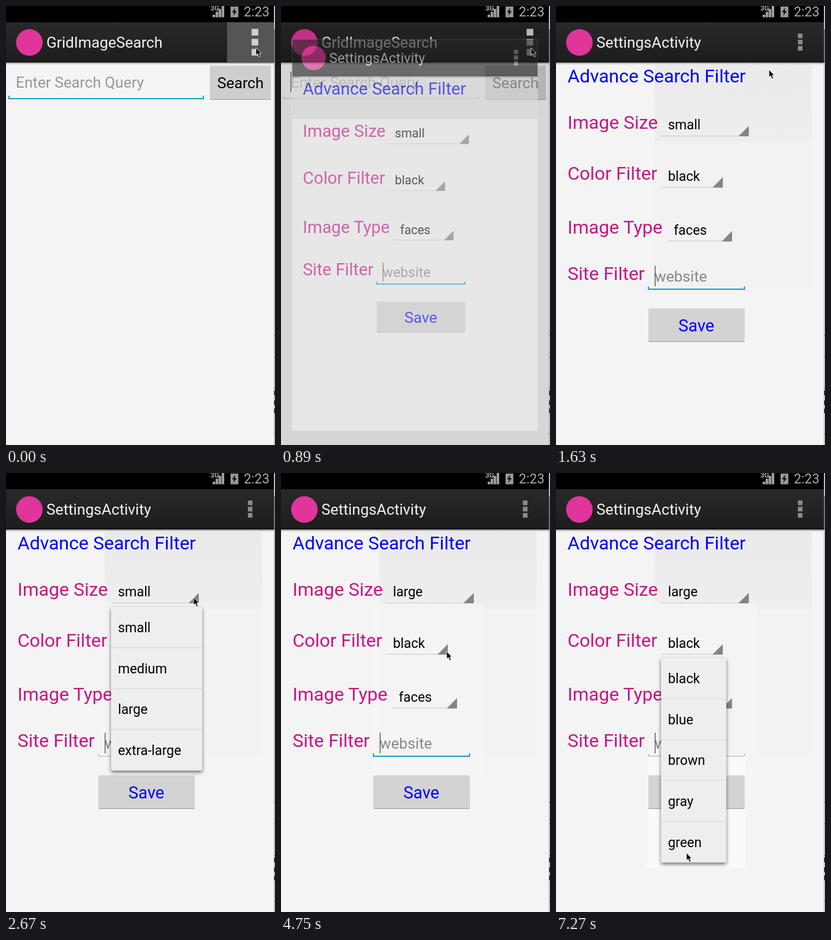
An HTML page for the animation above (8000 ms loop, 466 by 758 pixels).

```html
<!DOCTYPE html>
<html>
<head>
<meta charset="utf-8">
<style>
html, body { margin: 0; width: 100%; height: 100%; overflow: hidden; background: #f4f4f4; }
svg { display: block; width: 466px; height: 758px; overflow: hidden; font-family: Roboto, "Noto Sans", sans-serif; }
.popup > .panel { filter: drop-shadow(0 3px 3px rgba(0,0,0,.55)); }
</style>
</head>
<body>
<svg id="stage" viewBox="0 0 466 758"></svg>
<script>
const LOOP = 8000, ROW = 70.7;

const rect = (x, y, w, h, fill, extra = '') =>
  `<rect x="${x}" y="${y}" width="${w}" height="${h}" fill="${fill}" ${extra}/>`;
const text = (x, y, size, fill, value, extra = '') =>
  `<text x="${x}" y="${y}" font-size="${size}" fill="${fill}" ${extra}>${value}</text>`;
const path = (d, fill, extra = '') => `<path d="${d}" fill="${fill}" ${extra}/>`;

const header = title =>
  rect(0, 28, 464, 70, 'url(#bar)') + rect(0, 95.5, 464, 2, '#0c0c0c') +
  rect(0, 97.5, 464, 4, 'url(#shade)') +
  `<circle cx="40.5" cy="63" r="23" fill="#e0359a"/>` + text(70, 72, 26.2, '#f3f3f3', title);

const dots = (x, y, size, pitch, fill) =>
  [0, 1, 2].map(i => rect(x, y + i * pitch, size, size, fill)).join('');

const button = (x, y, w, h, fill) =>
  rect(x, y + 1, w, h, '#999', 'rx="2"') + rect(x, y, w, h, fill, 'rx="2"');

const underline = (id, x1, x2, y) => {
  const d = `M${x1} ${y - 5}V${y}H${x2}V${y - 5}`;
  return `<g id="${id}Focus">${path(d, 'none', 'stroke="#0f9bc9" stroke-width="2"')}</g>` +
         `<g id="${id}Blur">${path(d, 'none', 'stroke="#aaa"')}</g>`;
};

const spinner = (id, x, right, y, value) =>
  rect(x, y - 47, right - x, 47, '#33b5e5', `id="${id}Press" opacity="0"`) +
  rect(x, y - 1, right - x, 1, '#c6c6c6') +
  path(`M${right} ${y - 18}V${y}H${right - 18}Z`, '#858585') +
  text(x + 12, y - 12, 23.3, '#000', value, `id="${id}Value"`);

const popup = (id, x, y, w, items) =>
  `<g id="${id}" class="popup">` +
  rect(x, y, w, items.length * ROW, '#eee', 'rx="2" class="panel"') +
  rect(x, y + 2 * ROW, w, ROW, '#d4d4d4', `id="${id}Pick" opacity="0"`) +
  items.map((item, i) =>
    (i ? rect(x, y + i * ROW - .5, w, 1, '#d8d8d8') : '') +
    text(x + 12, y + i * ROW + 44, 23.3, '#000', item)).join('') + '</g>';

const label = (y, value) => text(20, y, 32, '#c71585', value);

const searchScreen =
  rect(0, 28, 464, 730, '#f4f4f4') + header('GridImageSearch') +
  rect(383, 28, 81, 69.5, '#555', 'id="pressed"') + dots(425.5, 39.5, 11.5, 17.3, '#d0d0d0') +
  text(17, 141, 26.2, '#979797', 'Enter Search Query') +
  rect(16.5, 113, 1.2, 36, '#444', 'id="caret"') + underline('query', 5, 342, 160) +
  button(353, 103, 106, 58, '#cecece') + text(366, 142, 26.2, '#000', 'Search');

const settingsScreen =
  rect(0, 28, 464, 737, '#f4f4f4') +
  `<g id="residue">${rect(171, 98, 272, 137, 'url(#patch)') + rect(171, 235, 272, 251, '#f2f2f2')}</g>` +
  rect(158, 224, 192, 300, '#f7f7f7', 'id="sizeGhost"') +
  rect(158, 490, 170, 192, '#fafafa', 'id="colorGhost"') +
  header('SettingsActivity') + dots(419, 47.5, 8, 10.8, '#8a8a8a') +
  text(20, 132, 32, '#00f', 'Advance Search Filter') +
  label(212, 'Image Size') + label(300, 'Color Filter') +
  label(393, 'Image Type') + label(473, 'Site Filter') +
  spinner('size', 182, 334, 225, 'small') + spinner('color', 182, 289, 313.5, 'black') +
  spinner('type', 192, 305, 406.5, 'faces') +
  text(171, 476, 26.2, '#888', 'website') + rect(171, 448.5, 1.3, 35.5, '#444') +
  underline('site', 160, 326.5, 489) +
  button(160, 522, 167, 57, '#d3d3d3') + text(212, 561.5, 29.1, '#00f', 'Save');

const statusBar = rect(0, 0, 464, 28, '#000') +
  text(354, 8, 12, '#aaa', '3G', 'font-weight="700"') +
  [0, 1, 2, 3].map(i => rect(358 + i * 5.2, 15 - i * 5, 4.4, 4.5 + i * 5, '#a0a0a0')).join('') +
  rect(389, 1, 13.5, 18.5, '#999') + path('M397 3L391.500 11H395L393.500 17L400 9H396.500Z', '#111') +
  text(412, 18, 23, '#aaa', '2:23');

const edge = rect(464, 0, 2, 758, '#dcdcdc') + rect(464, 0, 1, 758, '#a5a5a5') +
  rect(464, 40, 2, 58, '#777') +
  [568, 605, 660, 738].map(y => rect(464, y, 2, 1, '#777')).join('') +
  [664, 681, 695].map(y => rect(464.5, y, 1.5, 8, '#223')).join('');

const gradient = (id, from, to) =>
  `<linearGradient id="${id}" x2="0" y2="1"><stop stop-color="${from}"/><stop offset="1" stop-color="${to}"/></linearGradient>`;

document.getElementById('stage').innerHTML =
  `<defs>${gradient('bar', '#292929', '#1d1d1d') + gradient('shade', '#999', '#f4f4f4') + gradient('patch', '#eaeaea', '#eee')}</defs>` +
  searchScreen + rect(0, 28, 464, 730, '#000', 'id="dim"') +
  `<g id="settings">${settingsScreen}</g>` +
  rect(20, 122, 424, 73, '#000', 'id="band"') +
  popup('sizeMenu', 182, 231, 158, ['small', 'medium', 'large', 'extra-large']) +
  popup('colorMenu', 182, 319, 113, ['black', 'blue', 'brown', 'gray', 'green']) +
  statusBar + edge +
  `<g id="mouse">${path('M0 0V13L3 10.4L5.300 15.800L7.600 14.800L5.400 9.700H9.200Z', '#000', 'stroke="#fff" stroke-width=".8"')}</g>`;

// Each key is [time, ...values]; values hold until the next key.
const mouseKeys = [
  [0, 433, 72], [1630, 369, 110], [1780, 347, 158], [1930, 330, 198], [2080, 325, 215],
  [2820, 318, 235], [2970, 302, 275], [3120, 286, 320], [3270, 268, 365], [3420, 255, 400], [3560, 250, 410],
  [4300, 255, 388], [4450, 268, 352], [4600, 280, 322], [4750, 287, 308],
  [5640, 281, 330], [5790, 269, 370], [5940, 256, 418], [6080, 250, 443],
  [6530, 246, 480], [6680, 240, 530], [6830, 231, 582], [6980, 224, 625], [7130, 222, 648], [7270, 226, 656]
];
// time, scale, opacity
const settingsKeys = [[0, .9, 0], [890, .9165, .58], [1040, .972, .88], [1190, .994, .98], [1330, 1, 1]];
const sizeMenuKeys = [[0, 1, 0], [2370, .92, .4], [2520, .985, .85], [2670, 1, 1], [3860, .976, .84], [4000, .95, .4], [4150, 1, 0]];
const colorMenuKeys = [[0, 1, 0], [5340, .97, .7], [5490, 1, 1]];

const at = (keys, t) => keys.filter(k => k[0] <= t).pop().slice(1);
const el = id => document.getElementById(id);
const fade = (id, value) => el(id).setAttribute('opacity', +value);
const within = (t, from, to) => t >= from && t < to;

function zoom(id, keys, t, cx, cy) {
  const [scale, opacity] = at(keys, t);
  el(id).setAttribute('transform', `translate(${cx} ${cy}) scale(${scale}) translate(${-cx} ${-cy})`);
  fade(id, opacity);
  return opacity;
}

function focus(id, on) {
  fade(id + 'Focus', on);
  fade(id + 'Blur', !on);
}

function draw(t) {
  fade('pressed', t < 290);
  fade('caret', t >= 290);
  focus('query', t < 290);
  fade('dim', t >= 890 ? .12 : 0);
  fade('band', within(t, 890, 1040) ? .06 : 0);
  zoom('settings', settingsKeys, t, 232, 383);
  fade('residue', t >= 1330);
  fade('sizeGhost', t >= 2370 ? .6 : 0);
  fade('colorGhost', t >= 5340);

  const sizeOpen = zoom('sizeMenu', sizeMenuKeys, t, 261, 231);
  const colorOpen = zoom('colorMenu', colorMenuKeys, t, 238.5, 319);
  focus('site', !sizeOpen && !colorOpen);
  fade('sizePress', within(t, 2230, 2370) ? .2 : 0);
  fade('colorPress', within(t, 5190, 5340) ? .2 : 0);
  fade('sizeMenuPick', within(t, 3710, 4150));
  el('sizeValue').textContent = t < 3860 ? 'small' : 'large';

  el('mouse').setAttribute('transform', `translate(${at(mouseKeys, t).join(' ')})`);
}

const start = performance.now();
function frame() {
  draw((performance.now() - start) % LOOP);
  requestAnimationFrame(frame);
}
frame();
</script>
</body>
</html>
```
